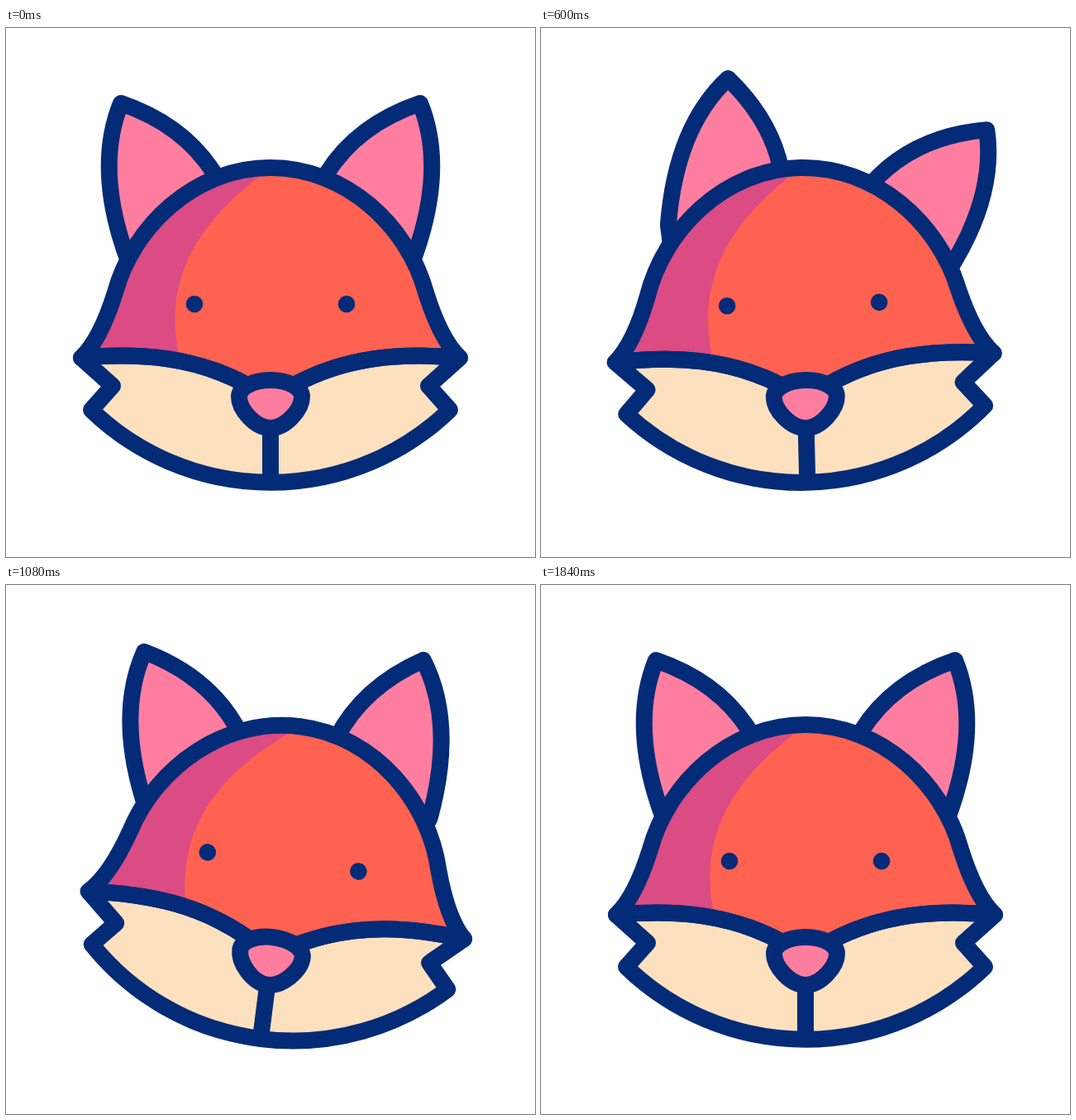
Write an HTML page that moves like this. It is 640 px wide and 640 px high and loops after 2 s.

```html
<!DOCTYPE html>
<html lang="en">
<head>
<meta charset="utf-8">
<title>Fox</title>
<style>
  html, body { margin: 0; width: 100%; height: 100%; overflow: hidden; background: #fff; }
  svg { display: block; width: 100%; height: 100%; }
  .line { stroke: #042b77; stroke-width: 20; stroke-linecap: round; stroke-linejoin: round; }
</style>
</head>
<body>
<svg viewBox="0 0 640 640">
  <defs>
    <path id="ear" class="line" fill="#ff7ea0"
      d="M175 325L148 282C123 215 115 150 139 91Q215 117 252 176L272 212"/>
    <path id="skull"
      d="M91 399C109 382 122 352 132 320C154 240 228 169 320 169C412 169 486 240 508 320C518 352 531 382 549 399C475 392 410 399 350 431L320 450L290 431C230 399 165 392 91 399Z"/>
  </defs>
  <g id="head">
    <g id="left"><use href="#ear"/></g>
    <g id="right"><use href="#ear" transform="translate(640) scale(-1 1)"/></g>

    <!-- skull and its shaded side -->
    <use href="#skull" fill="#ff6250"/>
    <path fill="#db4b84"
      d="M91 399C109 382 122 352 132 320C154 240 228 169 320 169L305 181C215 250 195 320 208 392L209 401Z"/>

    <!-- muzzle -->
    <path class="line" fill="#fde0be"
      d="M91 399L129 433L103 462A312 312 0 0 0 537 462L511 433L549 399C475 392 410 399 350 431L320 450L290 431C230 399 165 392 91 399Z"/>
    <use href="#skull" class="line" fill="none"/>
    <path class="line" d="M320 484V549"/>
    <path class="line" fill="#ff7ea0"
      d="M320 426C343 426 358 436 358 446C358 462 338 484 320 484C302 484 282 462 282 446C282 436 297 426 320 426Z"/>
    <g fill="#042b77">
      <circle cx="228" cy="334" r="10.3"/>
      <circle cx="412" cy="334" r="10.3"/>
    </g>
  </g>
</svg>
<script>
  const LOOP = 2000, STEP = 40;
  const SOFT = 0.364, FIRM = 0.5;

  // Each key: time in ms, angle in degrees, ease used to arrive there.
  const parts = [
    { id: 'head', pivot: '320 454',
      keys: [[0, 0], [380, -17.6, SOFT], [862, 20, SOFT], [1333, -10, FIRM], [1740, 0, FIRM]] },
    { id: 'left', pivot: '256 282',
      keys: [[20, 0], [425, 39.6, FIRM], [910, -15, FIRM], [1358, 20, FIRM], [1820, 0, FIRM]] },
    { id: 'right', pivot: '384 282',
      keys: [[20, 0], [425, 29, FIRM], [905, -26, FIRM], [1362, 23, FIRM], [1800, 0, FIRM]] }
  ];
  for (const part of parts) part.node = document.getElementById(part.id);

  // Same curve as cubic-bezier(a, 0, 1 - a, 1).
  function ease(x, a) {
    let lo = 0, hi = 1, u = 0.5;
    for (let i = 0; i < 24; i++) {
      u = (lo + hi) / 2;
      const v = 1 - u;
      const at = 3 * a * u * v * v + 3 * (1 - a) * u * u * v + u * u * u;
      if (at < x) lo = u; else hi = u;
    }
    return u * u * (3 - 2 * u);
  }

  function angleAt(keys, t) {
    if (t <= keys[0][0]) return keys[0][1];
    for (let i = 1; i < keys.length; i++) {
      const [t0, from] = keys[i - 1], [t1, to, a] = keys[i];
      if (t < t1) return from + (to - from) * ease((t - t0) / (t1 - t0), a);
    }
    return keys[keys.length - 1][1];
  }

  const start = performance.now();

  function draw() {
    const elapsed = (performance.now() - start) % LOOP;
    const t = Math.floor(elapsed / STEP) * STEP;
    for (const { node, pivot, keys } of parts) {
      node.setAttribute('transform', `rotate(${angleAt(keys, t).toFixed(3)} ${pivot})`);
    }
    requestAnimationFrame(draw);
  }
  draw();
</script>
</body>
</html>
```
